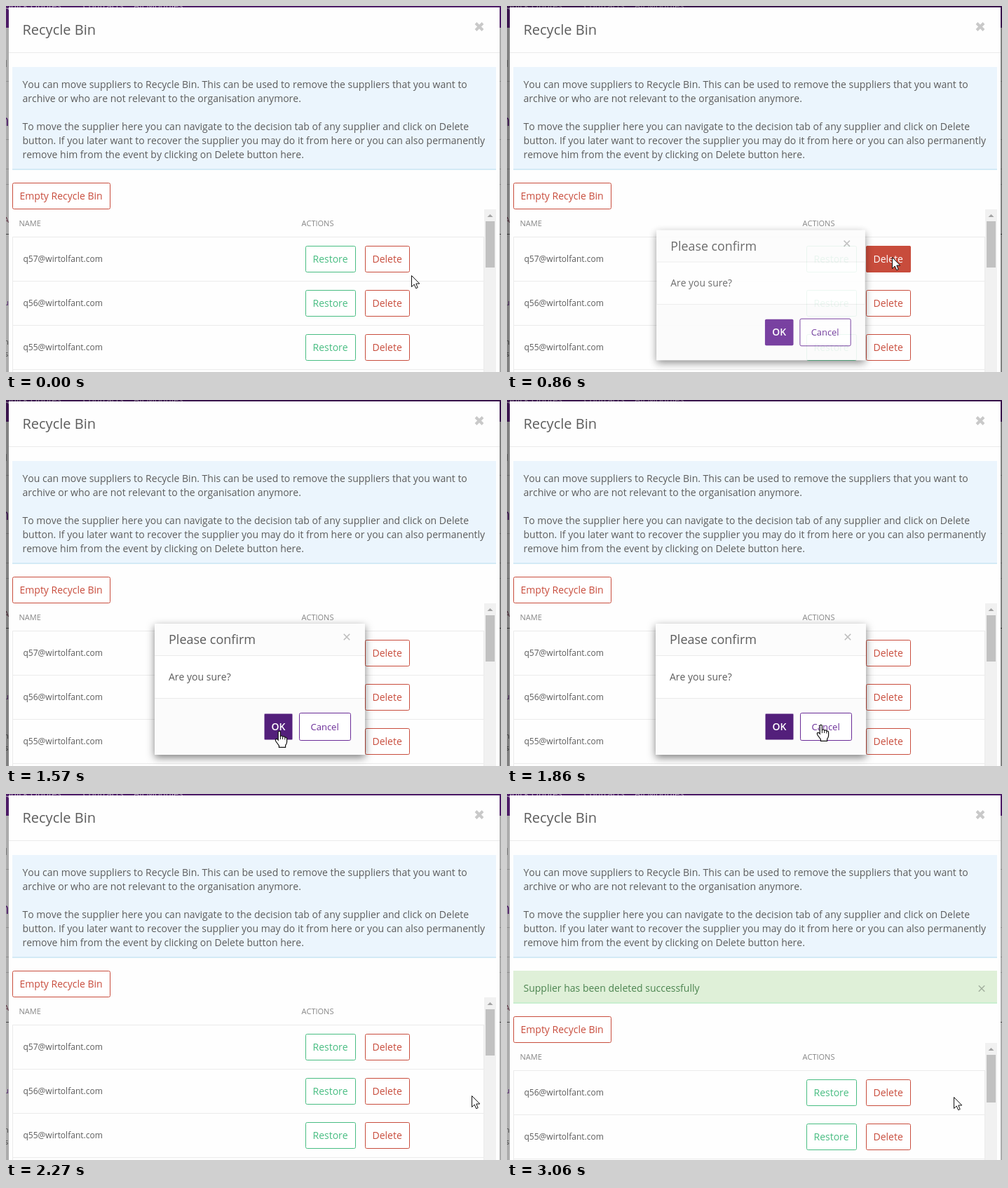
These frames come from a looping animation (706x522 px, 3810 ms). An HTML page:

```html
<!DOCTYPE html>
<html lang="en">
<head>
<meta charset="utf-8">
<title>Recycle Bin</title>
<style>
  html, body { margin: 0; width: 100%; height: 100%; overflow: hidden; background: #fff; }
  svg {
    display: block; width: 706px; height: 522px;
    font-family: "Open Sans", "Noto Sans", sans-serif; font-kerning: none;
  }
</style>
</head>
<body>
<svg id="stage" viewBox="0 0 706 522" xmlns="http://www.w3.org/2000/svg"></svg>
<script>
const LOOP = 3810;
const INK = '#5c5c5c', RED = '#c84c3c', GREEN = '#48bd82', PURPLE = '#6a2c97', LINE = '#ebebeb';

const text = (x, y, s, size = 14, fill = INK, extra = '') =>
  `<text x="${x}" y="${y}" font-size="${size}" fill="${fill}" ${extra}>${s}</text>`;
const rect = (x, y, w, h, fill, extra = '') =>
  `<rect x="${x}" y="${y}" width="${w}" height="${h}" fill="${fill}" ${extra}/>`;
const hline = (x, y, w, fill = LINE) => rect(x, y, w, 1, fill);
const button = (x, y, w, h, label, color, pad = 10.5, size = 14) =>
  rect(x + .5, y + .5, w - 1, h - 1, '#fff', `rx="2" stroke="${color}"`) +
  text(x + pad, y + h / 2 + 5, label, size, color);
const cross = (x, y, r, width, color) =>
  `<path d="M${x - r} ${y - r}l${2 * r} ${2 * r}m0 ${-2 * r}l${-2 * r} ${2 * r}" stroke="${color}" stroke-width="${width}" fill="none"/>`;

const page = `
  ${rect(0, 0, 706, 522, '#acacac')}
  ${rect(0, 0, 706, 31, '#4d1c67')}
  ${text(-3, 4, 'Quick Quotes', 13, '#b9a9c2')}
  ${text(109.5, 4, 'Contracts', 13, '#b9a9c2')}
  ${text(182, 4, 'All Modules', 13, '#b9a9c2')}
  ${[107, 190, 232, 254].map(y => hline(0, y, 706, '#8f8f8f')).join('')}
  ${hline(0, 325, 706, '#444')}
  ${text(-8, 87, 'al', 12, '#666')}
  ${text(-9, 171, 'n', 22, '#4d1c67')}
  ${text(-3, 309, 'A', 11, '#5d3040')}
  ${text(-3, 427, 'u', 11, '#4d1c67')}
  ${text(-3, 483, 'n', 11, '#444')}
  ${text(-2, 500, 's', 11, '#444')}`;

const intro = [
  'You can move suppliers to Recycle Bin. This can be used to remove the suppliers that you want to',
  'archive or who are not relevant to the organisation anymore.',
  '',
  'To move the supplier here you can navigate to the decision tab of any supplier and click on Delete',
  'button. If you later want to recover the supplier you may do it from here or you can also permanently',
  'remove him from the event by clicking on Delete button here.'
].map((line, i) => text(23.5, 117 + 20 * i, line)).join('');

const panel = `
  ${rect(4, 2, 700, 520, '#fefefe')}
  ${text(23.5, 41, 'Recycle Bin', 20)}
  ${cross(675, 29.5, 5, 4, '#c9c9c9')}
  ${hline(4, 66, 700)}
  ${rect(9, 87, 690, 147, '#ebf5fd')}
  ${rect(9, 232, 690, 2, '#d3eaf6')}
  ${intro}`;

const alertBox = `
  ${rect(9, 252, 690, 47, '#dff0d8')}
  ${rect(9, 297, 690, 2, '#c9efcf')}
  ${text(23.5, 282, 'Supplier has been deleted successfully', 14, '#4c8450')}
  ${cross(677, 277.5, 4.2, 1.5, '#a3b09f')}`;

const row = i => {
  const y = 329 + 63 * i;
  return `<g>${hline(9, y, 673)}${text(24.5, y + 36, '', 12)}
    ${button(427, y + 13, 72, 38, 'Restore', GREEN)}
    ${button(512, y + 13, 64, 38, 'Delete', RED)}</g>`;
};
const list = `
  ${button(9, 252, 140, 38, 'Empty Recycle Bin', RED)}
  ${text(18.5, 314, 'NAME', 11, '#868686')}
  ${text(421.5, 314, 'ACTIONS', 11, '#868686')}
  ${rect(9, 329, 1, 200, LINE)}${rect(681, 329, 1, 200, LINE)}
  <g id="rows">${[0, 1, 2, 3].map(row).join('')}</g>
  ${rect(682, 290, 17, 240, '#f1f1f1')}
  <path d="M686.5 301h8l-4-4z" fill="#a3a3a3"/>
  <rect id="thumb" x="684" y="307" width="13" fill="#c1c1c1"/>
  <g id="hover">${rect(512, 342, 64, 38, RED, 'rx="2"')}${text(522.5, 366, 'Delete', 14, '#fff')}</g>`;

const dialog = `
  ${rect(212, 319, 300, 187, '#fff', 'filter="url(#shadow)"')}
  ${rect(212, 319, 300, 45, '#fcfcfc')}
  ${rect(212, 426, 300, 80, '#fbfbfb')}
  ${hline(212, 364, 300)}${hline(212, 425, 300)}
  ${text(232, 348, 'Please confirm', 18)}
  ${cross(486, 338, 4.2, 1.6, '#bdbdbd')}
  ${text(232, 400, 'Are you sure?')}
  <rect id="ok" x="368" y="447" width="41" height="38" rx="2"/>
  <rect id="focus" x="368.5" y="447.5" width="40" height="37" fill="none" stroke="#fff" stroke-dasharray="1 1"/>
  ${text(378.5, 471, 'OK', 14, '#fff', 'font-weight="600"')}
  ${button(418, 446, 74, 40, 'Cancel', PURPLE, 16.5, 13)}`;

const ARROW = 'M.5 .5V16.5L4.2 13 6.7 18.7 9.2 17.6 6.8 12H11.8Z';
const HAND = 'M-1.8 13V1.8Q-1.8 .4 -.2 .4T1.4 1.8V7.5Q3.9 6.2 4.6 8.2Q7 7.1 7.8 9.2Q10.6 8.6 10.6 11.5V15.5Q10.6 18.5 8.6 20.5V23.3H-.6V21L-5 15Q-6.3 12.6 -5 11.6T-1.8 13Z';

const stage = document.getElementById('stage');
stage.innerHTML = `
  <defs><filter id="shadow" x="-20%" y="-20%" width="140%" height="150%">
    <feDropShadow dx="0" dy="4" stdDeviation="6" flood-color="#000" flood-opacity=".5"/>
  </filter></defs>
  ${page}
  <rect id="dim" width="706" height="522"/>
  ${panel}
  <g id="alert">${alertBox}</g>
  <g id="list">${list}</g>
  <g id="dialog">${dialog}</g>
  <circle id="click" r="12" fill="#e8ac1e"/>
  <g id="cursor">
    <path id="arrow" d="${ARROW}" fill="#fff" stroke="#111"/>
    <g id="hand"><path d="${HAND}" fill="#fff" stroke="#111" stroke-width="1.2"/>
      <path d="M1.4 7.5V12M4.6 8.5V12M7.8 9.5V12.5" stroke="#111" fill="none"/></g>
  </g>`;

const el = Object.fromEntries([...stage.querySelectorAll('[id]')].map(node => [node.id, node]));
const set = (node, attrs) => { for (const key in attrs) node.setAttribute(key, attrs[key]); };

const smooth = p => p * p * p * (p * (6 * p - 15) + 10);
const mix = (a, b, p) => a + (b - a) * p;

// Progress in equal hard steps: the first lands at `from`, the last at `to`.
function ramp(t, from, to, steps) {
  if (t < from) return 0;
  const done = Math.floor((t - from) / (to - from) * (steps - 1)) + 1;
  return Math.min(done / steps, 1);
}

const DELETE = { x: 549, y: 358 }, OK = { x: 390, y: 472 };

// A click mark appears at once and fades out shortly after.
const flash = (t, start) => t < start ? 0 : .85 * (1 - ramp(t, start + 60, start + 140, 2));

function draw(t) {
  const approach = ramp(t, 70, 230, 3);
  const cross = ramp(t, 1080, 1570, 7);
  const leave = ramp(t, 1710, 2100, 6);
  const drift = ramp(t, 2550, 2860, 5);
  const moves = [[DELETE, approach], [OK, cross], [{ x: 664, y: 430 }, leave], [{ x: 637, y: 432 }, drift]];
  const pointer = moves.reduce((pos, [goal, p]) => ({
    x: mix(pos.x, goal.x, smooth(p)),
    y: mix(pos.y, goal.y, smooth(p))
  }), { x: 578, y: 384 });

  const onDelete = approach > .5 && t < 770;
  const onOk = cross > .8 && leave < .4;
  const visible = smooth(ramp(t, 690, 930, 4)) - smooth(ramp(t, 1870, 2090, 4));
  const dimmed = ramp(t, 690, 850, 3) - ramp(t, 2100, 2270, 3);
  const deleted = t >= 3060 ? 1 : 0;
  const target = t < 1080 ? DELETE : OK;

  [...el.rows.children].forEach((node, i) => {
    node.querySelector('text').textContent = `q${57 - i - deleted}@wirtolfant.com`;
  });
  set(el.list, { transform: `translate(0 ${65 * deleted})` });
  set(el.thumb, { height: 66 + 2 * deleted });
  set(el.alert, { opacity: deleted });
  set(el.hover, { opacity: approach * (1 - ramp(t, 1010, 1240, 4)) });
  set(el.dim, { opacity: .25 * dimmed });
  set(el.dialog, {
    opacity: visible,
    transform: `translate(362 412.5) scale(${mix(.9, 1, visible)}) translate(-362 -412.5)`
  });
  set(el.ok, { fill: cross > .8 ? '#531f7b' : PURPLE });
  set(el.focus, { opacity: cross === 1 ? 1 : 0 });
  set(el.click, { cx: target.x, cy: target.y, opacity: flash(t, target === DELETE ? 550 : 1710) });
  set(el.cursor, { transform: `translate(${Math.round(pointer.x)} ${Math.round(pointer.y)})` });
  set(el.hand, { opacity: onDelete || onOk ? 1 : 0 });
  set(el.arrow, { opacity: onDelete || onOk ? 0 : 1 });
}

const start = performance.now();
function tick() {
  draw((performance.now() - start) % LOOP);
  requestAnimationFrame(tick);
}
tick();
</script>
</body>
</html>
```
